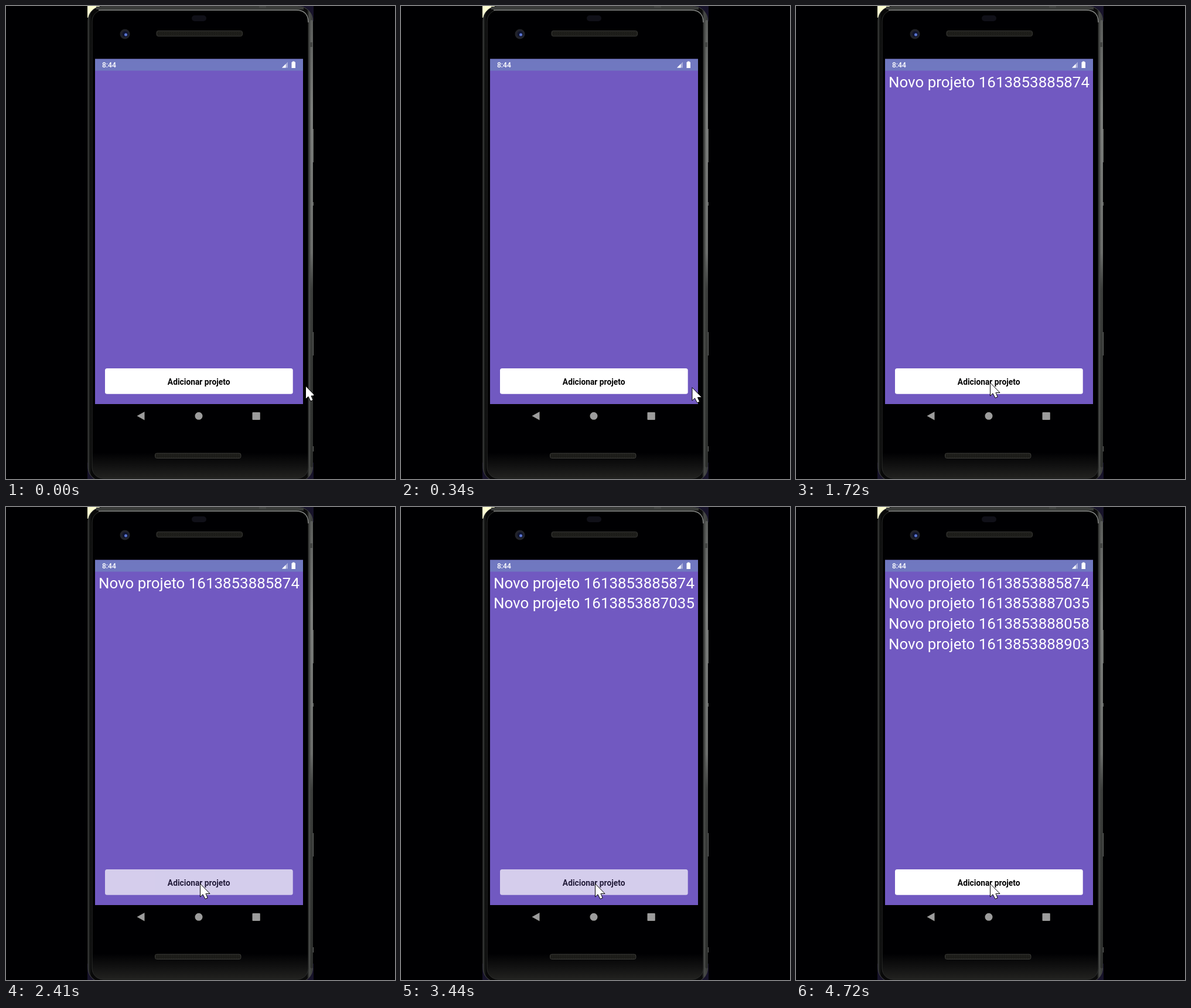
These frames come from a looping animation (664x808 px, 5.03 s). An HTML page:

```html
<!DOCTYPE html>
<html lang="pt">
<head>
<meta charset="utf-8">
<style>
  html, body { margin: 0; width: 100%; height: 100%; overflow: hidden; background: #000002; }
  svg { display: block; width: 664px; height: 808px; font-family: Roboto, sans-serif; }
</style>
</head>
<body>
<svg viewBox="0 0 664 808">
  <defs>
    <clipPath id="capture"><path d="M139 0H525V808H139Z"/></clipPath>
    <linearGradient id="edge">
      <stop offset="0" stop-color="#343634"/>
      <stop offset=".006" stop-color="#1c1e1d"/>
      <stop offset=".015" stop-color="#080808"/>
      <stop offset=".975" stop-color="#0b0b0b"/>
      <stop offset=".985" stop-color="#4a4c4a"/>
      <stop offset="1" stop-color="#343634"/>
    </linearGradient>
    <linearGradient id="shine" x2="0" y2="1">
      <stop offset="0" stop-color="#5a5c5a"/>
      <stop offset=".2" stop-color="#7c7e7c"/>
      <stop offset=".52" stop-color="#6c6e6c"/>
      <stop offset=".6" stop-color="#3c3e3c"/>
      <stop offset="1" stop-color="#2c2e2c"/>
    </linearGradient>
    <linearGradient id="face" x2="0" y2="1">
      <stop offset=".945" stop-color="#000002"/>
      <stop offset="1" stop-color="#222220"/>
    </linearGradient>
    <pattern id="mesh" width="3" height="3" patternUnits="userSpaceOnUse">
      <path d="M0 0H3V3H0Z" fill="#1b1b18"/><path d="M0 0H1V1H0Z" fill="#30302b"/>
    </pattern>
  </defs>

  <g clip-path="url(#capture)">
    <g id="phone">
      <path d="M139 0H160V20H139Z" fill="#ffffd2"/>
      <path d="M500 0H525V26H500ZM139 780H162V808H139ZM502 780H525V808H502Z" fill="#17132a"/>
      <path d="M523 210h2v57h-2ZM523 335h2v6h-2ZM523 557h2v40h-2ZM523 752h2v9h-2Z" fill="#656765"/>
      <rect x="140" y=".7" width="383.500" height="811" rx="24" fill="url(#edge)" stroke="#454745"/>
      <path d="M154 3.500H508" stroke="#3a3c3a" stroke-width="5"/>
      <rect x="519.500" y="24" width="4.500" height="764" rx="2" fill="url(#shine)"/>
      <rect x="147" y="7" width="369" height="800" rx="19" fill="url(#face)" stroke="#2c2e2c"/>
      <path d="M158 7H495Q516 7 516 28" fill="none" stroke="#858785" stroke-width="1.500"/>
      <path d="M518 62h5v8h-5ZM432 0h12v3h-12Z" fill="#444644"/>
      <rect x="317" y="16" width="25" height="10" rx="5" fill="#101018"/>
      <circle cx="203" cy="48" r="8.500" fill="#22232a"/>
      <circle cx="203.500" cy="48" r="5" fill="#10152f"/>
      <circle cx="204.500" cy="49" r="2.500" fill="#5a74d0"/>
      <g fill="url(#mesh)" stroke="#3a3a37">
        <rect x="257" y="42.500" width="146.500" height="9" rx="3"/>
        <rect x="254.500" y="764" width="146.500" height="8.500" rx="3"/>
      </g>

      <path d="M152 90.400H507V680H152Z" fill="#7159c1"/>
      <path d="M152 90.400H507V110.500H152Z" fill="#7078c0"/>
      <g fill="#fff">
        <text x="164" y="105" font-size="12.100" font-weight="500">8:44</text>
        <path d="M481 95.500V105.500H471Z" opacity=".4"/>
        <path d="M477.500 99V105.500H471Z"/>
        <path d="M489 94.500h3.500v1.200h1.500v10.300h-6.500v-10.300h1.500Z"/>
      </g>
      <g id="list" fill="#fff" font-size="25.900" text-anchor="middle"></g>
      <g id="button">
        <rect x="169" y="619" width="320.700" height="43.700" rx="3.500" fill="#fff"/>
        <text x="329.200" y="646.500" font-size="13.800" font-weight="700" text-anchor="middle">Adicionar projeto</text>
      </g>
      <g fill="#9c9c9c">
        <path d="M223.500 700.300L236.500 693V707.600Z"/>
        <circle cx="329" cy="700.300" r="6.500"/>
        <rect x="420.500" y="694" width="13.300" height="13" rx="1"/>
      </g>
    </g>
    <path id="cursor" d="M0 0V22.500L4.500 18.300L8.500 26L12.700 24.300L9.500 17H16.500Z" fill="#fff" stroke="#000"/>
  </g>
</svg>
<script>
const LOOP = 5030, FADE = 250, PRESSED = 0.7;
const taps = [
  { down: 1310, up: 1460, id: 1613853885874 },
  { down: 2410, up: 2600, id: 1613853887035 },
  { down: 3440, up: 3620, id: 1613853888058 },
  { down: 4270, up: 4465, id: 1613853888903 },
];
const [phone, list, button, cursor] =
  ['phone', 'list', 'button', 'cursor'].map(id => document.getElementById(id));

const rows = taps.map((tap, i) => {
  const row = document.createElementNS('http://www.w3.org/2000/svg', 'text');
  row.setAttribute('x', 329.5);
  row.setAttribute('y', 138.6 + i * 34.8);
  row.textContent = `Novo projeto ${tap.id}`;
  return list.appendChild(row);
});

const clamp = p => Math.min(1, Math.max(0, p));
const easeInOut = p => p < 0.5 ? 2 * p * p : 1 - 2 * (1 - p) ** 2;

function cursorAt(t) {
  if (t < 270) return [511.5, 649];
  if (t >= 860) return [331.5, 643.5];
  const p = easeInOut(clamp((t - 270) / 480));
  return [504.5 - 172 * p, 652 - 7.5 * p];
}

// The button dims at once and fades back after release.
function buttonOpacity(t) {
  const tap = taps.findLast(({ down }) => t >= down);
  if (!tap) return 1;
  return PRESSED + (1 - PRESSED) * easeInOut(clamp((t - tap.up) / FADE));
}

function draw(now) {
  const t = now % LOOP;
  phone.style.display = t >= 270 && t < 310 ? 'none' : '';
  cursor.setAttribute('transform', `translate(${cursorAt(t)})`);
  button.setAttribute('opacity', buttonOpacity(t));
  rows.forEach((row, i) => row.style.display = t >= taps[i].up + 20 ? '' : 'none');
}

const start = performance.now();
function tick() {
  draw(performance.now() - start);
  requestAnimationFrame(tick);
}
tick();
</script>
</body>
</html>
```
